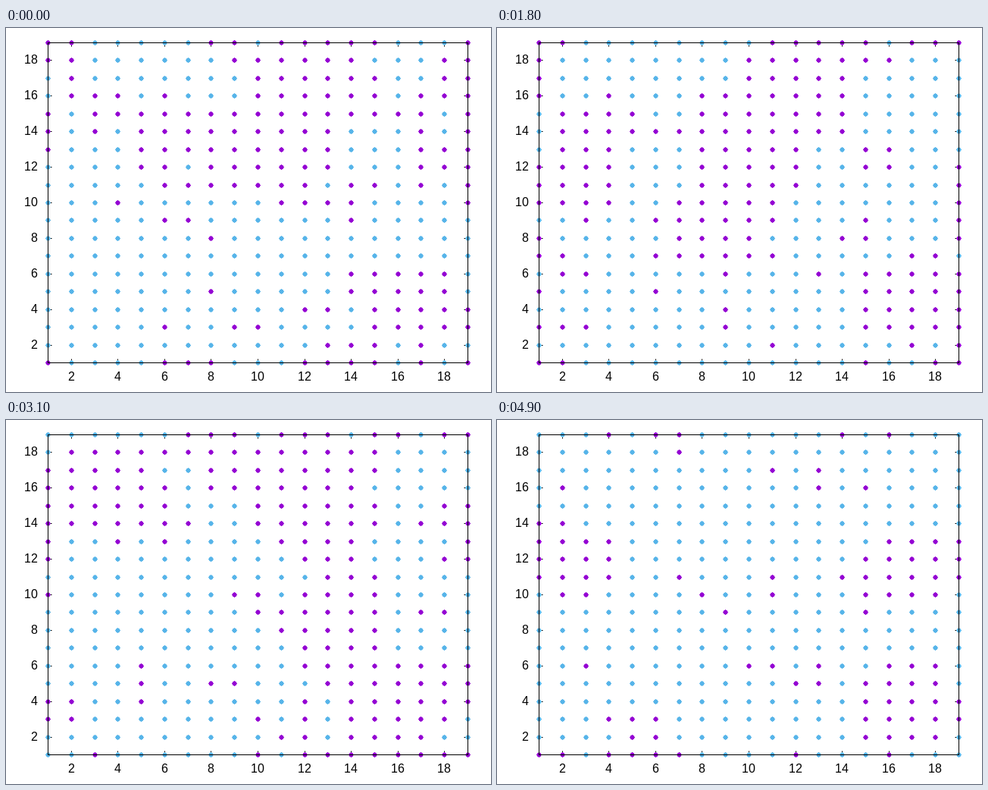
Write an HTML page with a canvas that moves like this. It is 640 px wide and 480 px high and loops after 5 s.

```html
<!DOCTYPE html>
<html lang="en">
<head>
<meta charset="utf-8">
<title>Spin lattice</title>
<style>
html, body { margin: 0; width: 100%; height: 100%; overflow: hidden; background: #fff; }
canvas { display: block; }
</style>
</head>
<body>
<canvas id="plot" width="640" height="480"></canvas>
<script>
const ctx = document.getElementById('plot').getContext('2d');
const N = 19, STEPS = 50, STEP_MS = 100;
const LEFT = 55, RIGHT = 609, TOP = 19, BOTTOM = 441;
const UP = '#9400d3', DOWN = '#56b4e9';
const COUPLING = 0.3, PULL = 1.5;

// Long-lived clusters: centre, radius, first and last step
const clusters = [
  { x: 16.8, y: 4.2, r: 2.3, from: 0, to: 50 },
  { x: 12, y: 17, r: 2.5, from: 0, to: 36 },
  { x: 10.3, y: 12.5, r: 2.5, from: 0, to: 25 },
  { x: 2.7, y: 12.2, r: 2.3, from: 8, to: 19 },
  { x: 8, y: 9, r: 2.1, from: 8, to: 19 },
  { x: 3.5, y: 15.7, r: 2.7, from: 21, to: 34 },
  { x: 12.5, y: 14, r: 2.3, from: 26, to: 36 },
  { x: 2.7, y: 11.8, r: 2.2, from: 41, to: 50 },
  { x: 16.6, y: 11.5, r: 2, from: 46, to: 50 }
];

function seeded(seed) {
  return () => {
    seed = (seed + 0x6d2b79f5) | 0;
    let t = Math.imul(seed ^ (seed >>> 15), 1 | seed);
    t = (t + Math.imul(t ^ (t >>> 7), 61 | t)) ^ t;
    return ((t ^ (t >>> 14)) >>> 0) / 4294967296;
  };
}

function smooth(a, b, t) {
  const u = Math.min(1, Math.max(0, (t - a) / (b - a)));
  return u * u * (3 - 2 * u);
}

// Share of up spins: nearly even, then a collapse late in the loop
const shareAt = step => 0.47 - 0.25 * smooth(32, 41, step);

// Heat-bath sweep of an Ising lattice with wrapped edges
function sweep(spins, step, bias, random) {
  const active = clusters.filter(c => step >= c.from && step <= c.to);
  const at = (x, y) => spins[((y + N) % N) * N + (x + N) % N];
  for (let y = 0; y < N; y++) {
    for (let x = 0; x < N; x++) {
      const sum = at(x - 1, y) + at(x + 1, y) + at(x, y - 1) + at(x, y + 1);
      const held = active.some(c => Math.hypot(x + 1 - c.x, y + 1 - c.y) <= c.r);
      const energy = COUPLING * sum + bias + (held ? PULL : 0);
      spins[y * N + x] = random() < 1 / (1 + Math.exp(-2 * energy)) ? 1 : -1;
    }
  }
}

function simulate() {
  const random = seeded(19), warmUp = 20;
  const spins = Array.from({ length: N * N }, () => random() < 0.45 ? 1 : -1);
  const history = [];
  let bias = -0.15;
  for (let i = -warmUp; i < STEPS; i++) {
    const step = Math.max(0, i);
    sweep(spins, step, bias, random);
    const share = spins.filter(s => s > 0).length / spins.length;
    bias += 0.6 * (shareAt(step + 1) - share);
    if (i >= 0) history.push(spins.slice());
  }
  return history;
}

const px = x => Math.round(LEFT + (x - 1) * (RIGHT - LEFT) / (N - 1)) + 0.5;
const py = y => Math.round(BOTTOM - (y - 1) * (BOTTOM - TOP) / (N - 1)) + 0.5;

function line(x1, y1, x2, y2) {
  ctx.moveTo(x1, y1);
  ctx.lineTo(x2, y2);
}

function drawAxes() {
  const l = LEFT + 0.5, r = RIGHT + 0.5, t = TOP + 0.5, b = BOTTOM + 0.5, tic = 5;
  ctx.strokeStyle = ctx.fillStyle = '#000';
  ctx.font = '16px "Liberation Sans", Arial, sans-serif';
  ctx.beginPath();
  for (let v = 2; v < N; v += 2) {
    const x = px(v), y = py(v), w = ctx.measureText(v).width;
    line(l, y, l + tic, y);
    line(r, y, r - tic, y);
    line(x, b, x, b - tic);
    line(x, t, x, t + tic);
    ctx.fillText(v, Math.round(42 - w), y + 4.5);
    ctx.fillText(v, Math.round(x - 0.5 - w / 2), 465);
  }
  ctx.stroke();
}

// A solid dot with four short tips
function drawDot(x, y, color) {
  ctx.fillStyle = color;
  ctx.beginPath();
  ctx.arc(x, y, 2.9, 0, 2 * Math.PI);
  ctx.fill();
  ctx.fillRect(x - 3.5, y - 0.5, 7, 1);
  ctx.fillRect(x - 0.5, y - 3.5, 1, 7);
}

function draw(spins) {
  ctx.fillStyle = '#fff';
  ctx.fillRect(0, 0, 640, 480);
  drawAxes();
  spins.forEach((s, i) =>
    drawDot(px(i % N + 1), py(Math.floor(i / N) + 1), s > 0 ? UP : DOWN));
  ctx.strokeStyle = '#000';
  ctx.strokeRect(LEFT + 0.5, TOP + 0.5, RIGHT - LEFT, BOTTOM - TOP);
}

const history = simulate();
const start = performance.now();

function tick() {
  const time = Math.max(0, performance.now() - start);
  draw(history[Math.floor(time / STEP_MS) % STEPS]);
  requestAnimationFrame(tick);
}
tick();
</script>
</body>
</html>
```
